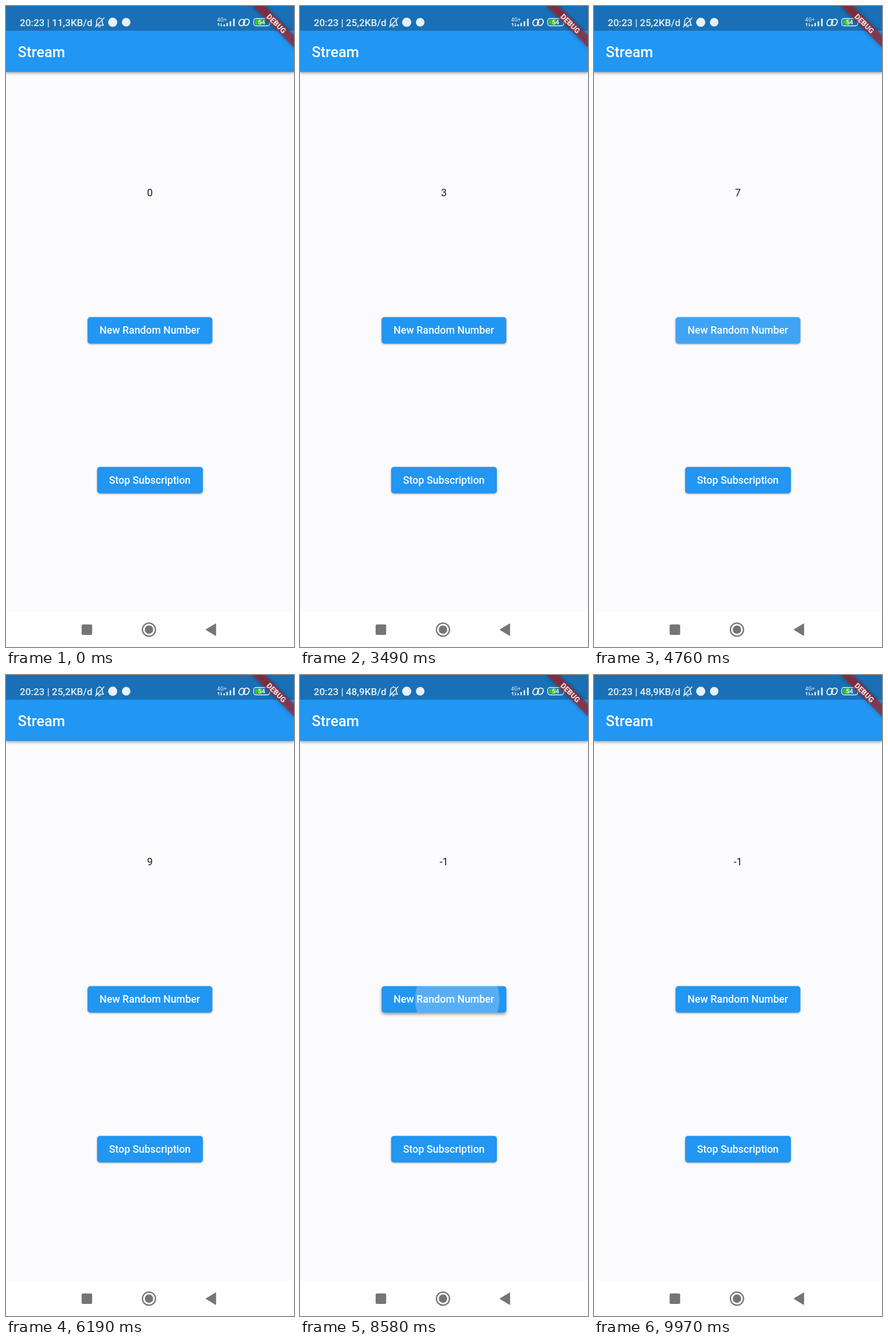
These frames come from a looping animation (502 px wide and 1115 px high, 10000 ms). An HTML page:

```html
<!DOCTYPE html>
<html lang="en">
<head>
<meta charset="utf-8">
<title>Stream</title>
<style>
  html, body { margin: 0; width: 100%; height: 100%; overflow: hidden; background: #fbfafc; }
  svg { display: block; width: 502px; height: 1115px; font-family: Roboto, sans-serif; }
  .label { font-size: 17.9px; font-weight: 500; fill: #fff; text-anchor: middle; }
  .bar { filter: drop-shadow(0 2px 2.5px rgba(0, 0, 0, .38)); }
  .banner { filter: drop-shadow(0 0 3.5px rgba(0, 0, 0, .5)); }
</style>
</head>
<body>
<svg viewBox="0 0 502 1115">
  <defs>
    <clipPath id="clipNew"><rect x="142.2" y="541.2" width="217.4" height="46" rx="5"/></clipPath>
    <clipPath id="clipStop"><rect x="158.9" y="801.8" width="184.2" height="46" rx="5"/></clipPath>
  </defs>

  <rect width="502" height="1115" fill="#fbfafc"/>
  <rect class="bar" width="502" height="114.7" fill="#2196f3"/>
  <rect width="502" height="43" fill="#1970b6"/>
  <text x="20.5" y="88.7" font-size="25.56" font-weight="500" fill="#fff">Stream</text>

  <!-- status bar -->
  <g fill="#e8f1f8">
    <text id="status" x="24" y="35" font-size="17.05" font-weight="500"></text>
    <g fill="none" stroke="#e8f1f8" stroke-width="1.6" stroke-linecap="round" stroke-linejoin="round">
      <path d="M157 33.5h13l-2-3v-4c0-7-10-7-10 0v4zM161.5 36h3M163 21v-1M156 36.5L171 20.5"/>
      <rect x="406.5" y="23" width="9" height="11.5" rx="4.5" transform="rotate(28 411 28.7)" stroke-width="2"/>
      <rect x="414.5" y="22.5" width="9" height="11.5" rx="4.5" transform="rotate(28 419 28.2)" stroke-width="2"/>
      <path d="M371 35v-5l-1.5 1.5M375 30v5l1.5-1.5" stroke-width="1.2"/>
      <rect x="431.7" y="21.7" width="28" height="12.8" rx="4" stroke-width="1.4"/>
    </g>
    <circle cx="186" cy="28.3" r="8"/>
    <circle cx="209.5" cy="28.3" r="7.5"/>
    <text x="368" y="26.6" font-size="9.3">4G+</text>
    <path d="M379 32h2.6v3.2H379zM384.2 29.5h2.6v5.7h-2.6zM389.8 26.5h2.6v8.7h-2.6zM395.8 22h2.8v13.2h-2.8z"/>
    <path d="M461 25.5q2 0 2 2.6t-2 2.6z"/>
    <path d="M434 26q0-2.2 2.2-2.2H447v8.6h-10.800q-2.200 0-2.200-2.200z" fill="#3fc01f"/>
    <text x="445.500" y="32.100" font-size="10.800" font-weight="500" text-anchor="middle" fill="#fff">54</text>
    <path d="M471 22l-5 7h3.500l-1 6 6-7.500h-3.700z"/>
  </g>

  <!-- corner banner -->
  <g transform="translate(502) rotate(45)">
    <rect class="banner" x="-51.1" y="35.8" width="102.2" height="15.3" fill="#b71c1c" fill-opacity=".627"/>
    <text y="48" font-size="13" font-weight="900" text-anchor="middle" fill="#fff" fill-opacity=".82">DEBUG</text>
  </g>

  <text id="number" x="250.900" y="330.700" font-size="17.900" text-anchor="middle" fill="#1f1f20"></text>

  <rect id="new" x="142.2" y="541.2" width="217.4" height="46" rx="5" fill="#2196f3"/>
  <g clip-path="url(#clipNew)"><circle id="newInk" fill="#fff"/></g>
  <text class="label" x="250.700" y="570.400">New Random Number</text>

  <rect id="stop" x="158.9" y="801.8" width="184.2" height="46" rx="5" fill="#2196f3"/>
  <g clip-path="url(#clipStop)"><circle id="stopInk" fill="#fff"/></g>
  <text class="label" x="250.700" y="831">Stop Subscription</text>

  <!-- navigation bar -->
  <rect y="1054" width="502" height="61" fill="#fefefe"/>
  <g fill="#757575">
    <rect x="131.800" y="1075.700" width="18.400" height="18.400" rx="2.500"/>
    <circle cx="249.200" cy="1084.800" r="11.400" fill="none" stroke="#757575" stroke-width="2.300"/>
    <circle cx="249.200" cy="1084.800" r="7.300"/>
    <path d="M349 1084.800L365.500 1074.800V1094.800Z" stroke="#757575" stroke-width="1.400" stroke-linejoin="round"/>
  </g>
</svg>
<script>
const LOOP = 10000, GROW = 225, FADE = 375;
const el = id => document.getElementById(id);
const clamp = v => Math.min(1, Math.max(0, v));
const lerp = (a, b, p) => a + (b - a) * p;

const buttons = {
  new: { cy: 564.2, w: 217.4, touch: 295 },
  stop: { cy: 824.8, w: 184.2, touch: 262 }
};

// shown: first visible moment, when later than the press itself
const taps = [
  { down: 1120, up: 1205, shown: 1340, number: '9' },
  { down: 2655, up: 2735, shown: 2640, number: '3' },
  { down: 3570, up: 3685, number: '5' },
  { down: 4390, up: 4470, number: '7' },
  { down: 5725, up: 5812, number: '9' },
  { down: 7275, up: 7325, button: 'stop' },
  { down: 8458, up: 8535, number: '-1' },
  { down: 9305, up: 9385, number: '-1' }
];

// cubic-bezier(.25, .1, .25, 1)
function ease(x) {
  const bez = (a, b, p) => 3 * a * p * (1 - p) ** 2 + 3 * b * p * p * (1 - p) + p ** 3;
  let lo = 0, hi = 1;
  for (let i = 0; i < 20; i++) {
    const mid = (lo + hi) / 2;
    if (bez(.25, .25, mid) < x) lo = mid; else hi = mid;
  }
  return bez(.1, 1, lo);
}

function drawButton(id, tap, t) {
  const { cy, w, touch } = buttons[id];
  const ink = el(id + 'Ink');
  let lift = 0, alpha = 0;
  if (tap) {
    const held = Math.min(t, tap.up) - tap.down;
    const after = Math.max(0, t - tap.up);
    const p = ease(clamp(held / 1000 + after / GROW));
    const target = Math.hypot(w, 46) / 2;
    lift = clamp(clamp(held / 100) - after / 200);
    alpha = .24 * clamp((t - tap.down) / 75) * clamp((FADE - after) / (FADE - GROW));
    ink.setAttribute('cx', lerp(touch, 250.9, p));
    ink.setAttribute('cy', cy);
    ink.setAttribute('r', lerp(target * .3, target + 6.4, p));
  }
  ink.setAttribute('fill-opacity', alpha);
  el(id).style.filter =
    `drop-shadow(0 ${1.5 + 3 * lift}px ${1.4 + 2 * lift}px rgba(0,0,0,.38))`;
}

function draw(t) {
  const rate = t < 3490 ? '11,3' : t < 7490 ? '25,2' : '48,9';
  el('status').textContent = `20:23 | ${rate}KB/d`;

  let number = '0';
  const active = {};
  for (const tap of taps) {
    const shown = tap.shown || 0;
    if (tap.number && t >= Math.max(tap.up, shown)) number = tap.number;
    if (t >= Math.max(tap.down, shown) && t < tap.up + FADE) active[tap.button || 'new'] = tap;
  }
  el('number').textContent = number;
  for (const id in buttons) drawButton(id, active[id], t);
}

function frame() {
  draw(performance.now() % LOOP);
  requestAnimationFrame(frame);
}
frame();
</script>
</body>
</html>
```
